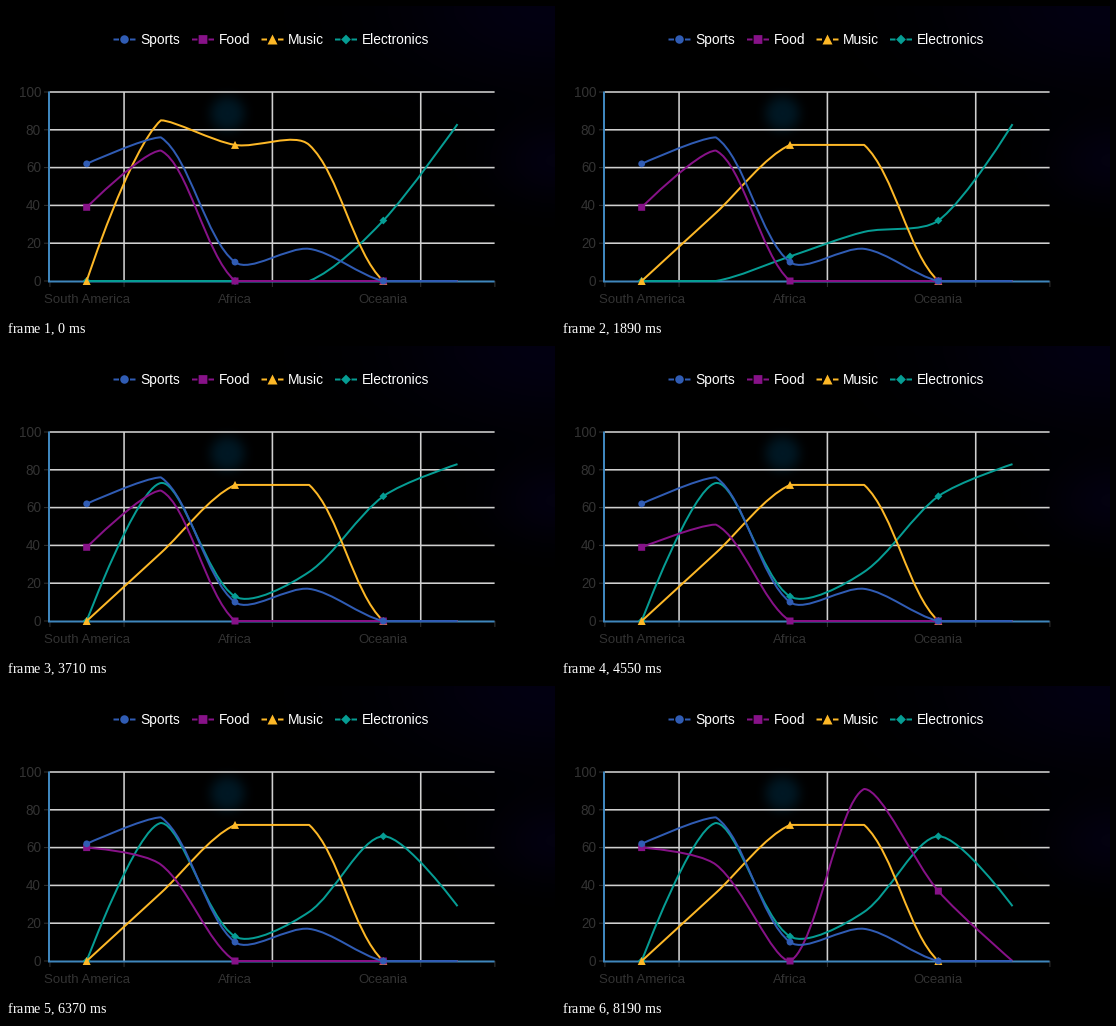
These frames come from a looping animation (549x312 px, 8.61 s). A matplotlib script:

```python
import numpy as np
import matplotlib.pyplot as plt
from matplotlib.animation import FuncAnimation
from matplotlib.patches import Circle, PathPatch, Polygon
from matplotlib.path import Path

W, H, DPI = 549, 312, 72
STEP_MS, FRAMES = 70, 123
LEFT, RIGHT, TOP, BASE = 43.6, 488.6, 86, 275
BAND = (RIGHT - LEFT) / 6
SMOOTH = 0.3
AXIS, GRID, DIM = "#3f86bd", "#d0d0d0", "#333333"
RADII = {"circle": 3.4, "square": 3.5, "triangle": 4, "diamond": 3.9}
LEGEND_SCALE = 1.25

# name: color, marker shape, legend centre, starting values
SERIES = {
    "Sports": ("#305cb4", "circle", 118.5, [62, 76, 10, 17, 0, 0]),
    "Food": ("#871288", "square", 197, [39, 69, 0, 0, 0, 0]),
    "Music": ("#fdb827", "triangle", 266.5, [0, 85, 72, 72, 0, 0]),
    "Electronics": ("#069d94", "diamond", 340, [0, 0, 0, 0, 32, 83]),
}

# (step, series, point, new value)
EDITS = [
    (1, "Electronics", 2, 13),
    (14, "Electronics", 3, 26),
    (27, "Music", 1, 36),
    (40, "Electronics", 1, 73),
    (53, "Electronics", 4, 66),
    (65, "Food", 1, 51),
    (78, "Food", 0, 60),
    (91, "Electronics", 5, 29),
    (104, "Food", 3, 91),
    (117, "Food", 4, 37),
]

fig = plt.figure(figsize=(W / DPI, H / DPI), dpi=DPI, facecolor="black")
ax = fig.add_axes([0, 0, 1, 1])
ax.set_xlim(0, W)
ax.set_ylim(H, 0)
ax.axis("off")


def y_of(value):
    return BASE - np.asarray(value) * (BASE - TOP) / 100


def points_of(values):
    xs = LEFT + BAND * (np.arange(6) + 0.5)
    return np.column_stack([xs, y_of(values)])


def smooth_path(pts):
    """Bezier spline whose control points stay inside the bounding box."""
    low, high = pts.min(axis=0), pts.max(axis=0)
    verts, out = [pts[0]], pts[0]
    for i in range(1, len(pts)):
        p, into, leave = pts[i], pts[i], pts[i]
        if i < len(pts) - 1:
            chord = pts[i + 1] - pts[i - 1]
            before = np.hypot(*(p - pts[i - 1]))
            after = np.hypot(*(pts[i + 1] - p))
            ratio = after / (before + after)
            into = p - chord * SMOOTH * (1 - ratio)
            leave = p + chord * SMOOTH * ratio
        verts += [np.clip(out, low, high), np.clip(into, low, high), p]
        out = leave
    return Path(verts, [Path.MOVETO] + [Path.CURVE4] * (len(verts) - 1))


def outline(shape, x, y, r):
    corners = {
        "square": [(-1, -1), (1, -1), (1, 1), (-1, 1)],
        "triangle": [(0, -1), (1, 1), (-1, 1)],
        "diamond": [(0, -1), (1, 0), (0, 1), (-1, 0)],
    }[shape]
    return [(x + r * a, y + r * b) for a, b in corners]


def marker(shape, x, y, color, z, scale=1):
    r = RADII[shape] * scale
    if shape == "circle":
        patch = Circle((x, y), r, fc=color, lw=0, zorder=z)
    else:
        patch = Polygon(outline(shape, x, y, r), fc=color, lw=0, zorder=z)
    patch.set_snap(False)
    return ax.add_patch(patch)


def move_marker(patch, shape, x, y):
    if shape == "circle":
        patch.center = (x, y)
    else:
        patch.set_xy(outline(shape, x, y, RADII[shape]))


def segment(x0, y0, x1, y1, color, width, z):
    ax.plot([x0, x1], [y0, y1], color=color, lw=width, zorder=z,
            solid_capstyle="butt", snap=False)


def label(x, y, text, size, color, ha):
    ax.text(x, y, text, size=size, color=color, ha=ha, va="baseline",
            family="Liberation Sans", zorder=4)


def draw_background():
    yy, xx = np.mgrid[0:H, 0:W]

    def glow(cx, cy, sx, sy, rgb, power=1):
        dist = ((xx - cx) / sx) ** 2 + ((yy - cy) / sy) ** 2
        return np.exp(-dist ** power)[..., None] * np.array(rgb) / 255

    image = (glow(221, 107, 18, 18, (0, 24, 36), 1.6)
             + glow(W, 0, 160, 80, (3, 1, 18))
             + glow(W, 155, 60, 40, (3, 1, 15)))
    ax.imshow(image, extent=(0, W, H, 0), aspect="auto", zorder=0)


def draw_axes():
    for value in range(0, 101, 20):
        y = float(y_of(value))
        if value:
            segment(LEFT, y, RIGHT, y, GRID, 1.6, 1)
        segment(38, y, 43, y, DIM, 1, 1)
        label(35, y + 4.8, str(value), 13.5, DIM, "right")
    for k in (0, 1, 3, 5, 6):
        x = LEFT + BAND * k + 0.3
        if k in (1, 3, 5):
            segment(x, TOP, x, BASE, GRID, 1.6, 1)
        segment(x, BASE, x, BASE + 6, DIM, 1, 1)
    segment(43, TOP - 0.5, 43, BASE + 1, AXIS, 2, 2)
    segment(42, BASE + 0.5, RIGHT, BASE + 0.5, AXIS, 2, 2)
    for k, region in enumerate(("South America", "Africa", "Oceania")):
        label(LEFT + BAND * (2 * k + 0.5), 297, region, 13.3, DIM, "center")


def draw_legend():
    for name, (color, shape, x, _) in SERIES.items():
        segment(x - 11, 33.5, x - 5.5, 33.5, color, 2, 4)
        segment(x + 5.5, 33.5, x + 11, 33.5, color, 2, 4)
        marker(shape, x, 33.5, color, 4, LEGEND_SCALE)
        label(x + 15.5, 38, name, 13.8, "white", "left")


draw_background()
draw_axes()
draw_legend()

curves, dots = {}, {}
for order, (name, (color, shape, _, values)) in enumerate(SERIES.items()):
    z = 3 - order * 0.1
    pts = points_of(values)
    curves[name] = ax.add_patch(PathPatch(
        smooth_path(pts), fc="none", ec=color, lw=2, zorder=z,
        capstyle="butt", joinstyle="bevel"))
    dots[name] = [marker(shape, x, y, color, z + 0.05) for x, y in pts[::2]]


def update(step):
    data = {name: list(spec[3]) for name, spec in SERIES.items()}
    for start, name, index, value in EDITS:
        if step >= start:
            data[name][index] = value
    for name, values in data.items():
        pts = points_of(values)
        curves[name].set_path(smooth_path(pts))
        for dot, (x, y) in zip(dots[name], pts[::2]):
            move_marker(dot, SERIES[name][1], x, y)
    return []


anim = FuncAnimation(fig, update, frames=FRAMES, interval=STEP_MS,
                     repeat=True, repeat_delay=0, blit=False)
plt.show()
```
